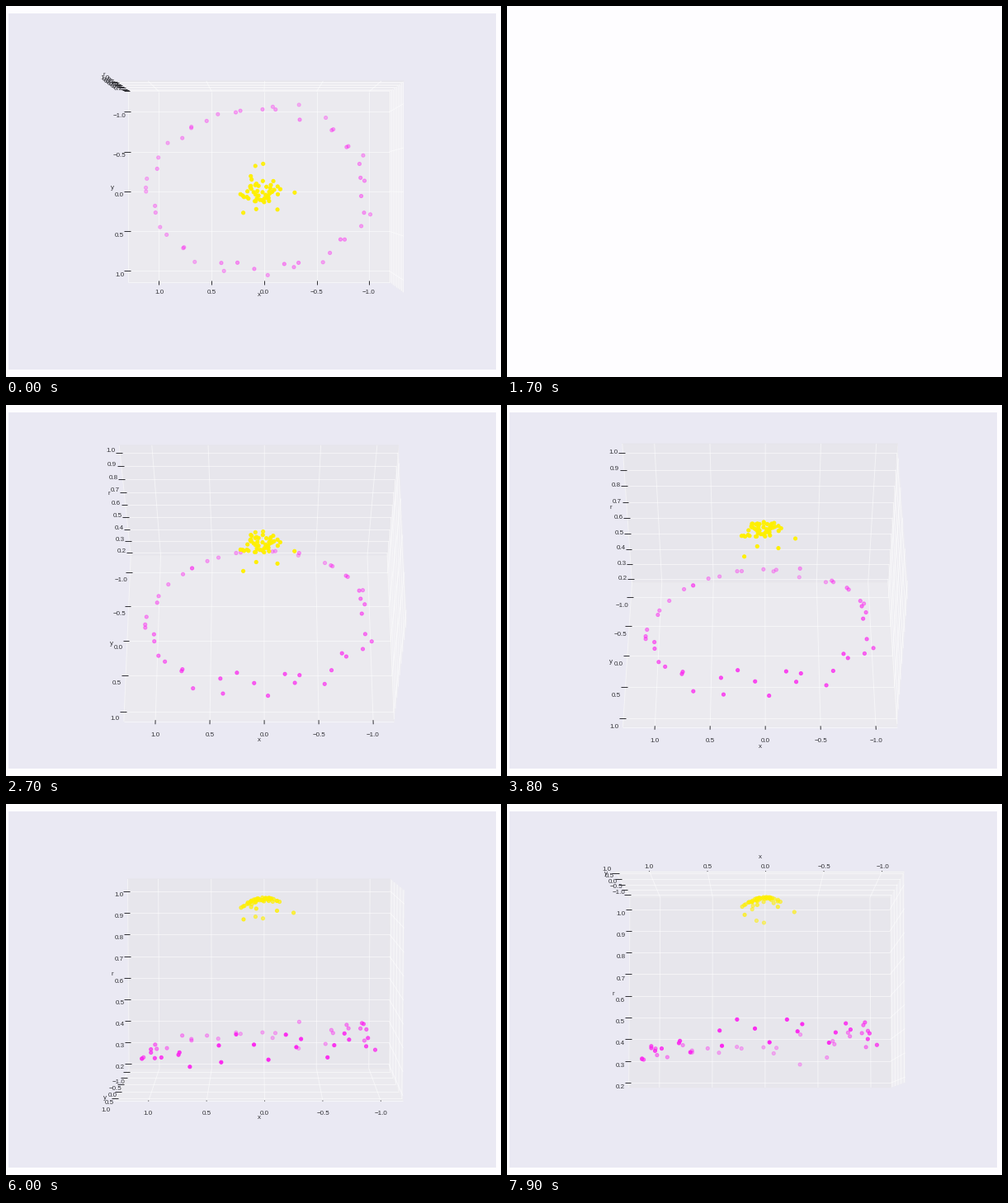
A matplotlib script that plays this animation: 600x450 px, repeating every 8000 ms.

```python
import numpy as np
import matplotlib.pyplot as plt
from matplotlib.animation import FuncAnimation
from matplotlib.collections import LineCollection, PolyCollection
from matplotlib.patches import Rectangle

W, H, FRAMES, STEP = 600, 450, 80, 100
PT = 0.72                                   # points per pixel at 100 dpi
INK = "#333338"
BLANK = 17                                  # redraw flicker

plt.rcParams["font.family"] = "Liberation Sans"

# The elevation is dragged by hand, with short rests
RESTS = [*range(6), 9, 12, 28, 32, 39, 40, 46, 50, 54, 61, 62, 72]
KEYS = {5: 90, 8: 83.5, 16: 80, 27: 58.2, 38: 46.5, 45: 30, 53: 17,
        60: 6.3, 71: 0.2, 79: -4.5}
steps = np.cumsum(~np.isin(np.arange(FRAMES), RESTS))
elev = np.interp(steps, steps[list(KEYS)], list(KEYS.values()))

# Axes rectangle in pixels and the scale of the perspective view
LEFT, TOP, BW, BH = 3, 9, 591, 432
KX, KY = BW / 0.185, BH / 0.185
CX, CY = LEFT + KX * 0.095, TOP + KY * 0.09
DIST = 10
EDGE = 0.5 + 1 / 48
TICK_PAD, NAME_PAD, DROP = 0.037, 0.067, 1.5

LOW = np.array([-1.14, -1.21, 0.196])
HIGH = np.array([1.24, 1.09, 1.038])
HALVES = np.linspace(-1, 1, 5)
TICKS = [HALVES, HALVES, np.linspace(0.2, 1, 9)]
NAMES = "xyr"
FLIP = (1, 0, 0)                            # direction of each axis' ticks


def circle(rng, radius, center, noise, n=50):
    t = np.linspace(0, 2 * np.pi, n, endpoint=False)
    ring = radius * np.column_stack([np.cos(t), np.sin(t)])
    return center + ring + noise(rng, (n, 2))


def to_cube(v, i=slice(None)):
    return (v - LOW[i]) / (HIGH[i] - LOW[i]) - 0.5


def project(p, angle):
    """Pixel positions and depths of cube points seen from azimuth 90."""
    x, y, z = np.moveaxis(np.asarray(p, float), -1, 0)
    s, c = np.sin(np.radians(angle)), np.cos(np.radians(angle))
    depth = DIST - (c * y + s * z)
    up = c * z - s * y
    return np.stack([CX - KX * x / depth, CY - KY * up / depth], -1), depth


def at(p, i, v):
    q = np.array(p, float)
    q[i] = v
    return q


def outward(p, i, pad):
    return at(p + np.sign(p) * pad, i, p[i])


def scene(angle):
    far = np.array([-EDGE, -EDGE, EDGE if angle < 0 else -EDGE])
    panes, grid, ticks, tick_pos, name_pos = [], [], [], [], []
    for i, f in enumerate(FLIP):
        j, k = (i + 1) % 3, (i + 2) % 3
        panes.append([at(at(far, j, a), k, b) for a, b in
                      ((-EDGE, -EDGE), (EDGE, -EDGE), (EDGE, EDGE), (-EDGE, EDGE))])
        base = at(far, f, -far[f])
        grid.append([at(base, i, -EDGE), at(base, i, EDGE)])
        for v in to_cube(TICKS[i], i):
            p = at(far, i, v)
            grid += [[p, at(p, j, -p[j])], [p, at(p, k, -p[k])]]
            q = at(base, i, v)
            ticks.append([at(q, f, q[f] - 0.1 / 12), at(q, f, q[f] + 0.2 / 12)])
            tick_pos.append(outward(q, i, TICK_PAD))
        name_pos.append(outward(at(base, i, 0), i, NAME_PAD))
    return [project(part, angle)[0]
            for part in (panes, grid, ticks, tick_pos, name_pos)]


rng = np.random.default_rng(4)
ring = circle(rng, 1, (0.03, -0.05), lambda r, n: r.uniform(-0.09, 0.09, n))
blob = circle(rng, 0.08, (0.02, -0.01), lambda r, n: r.normal(0, 0.08, n))
xy = np.vstack([ring, blob])
points = to_cube(np.column_stack([xy, np.exp(-(xy ** 2).sum(1))]))
colors = np.ones((len(xy), 4))
colors[:len(ring), :3] = 0.99, 0.15, 0.94
colors[len(ring):, :3] = 1, 0.94, 0

fig = plt.figure(figsize=(W / 100, H / 100), dpi=100, facecolor="#fefdff")
ax = fig.add_axes([0, 0, 1, 1])
ax.set(xlim=(0, W), ylim=(H, 0))
ax.axis("off")
ax.add_patch(Rectangle((LEFT, TOP), BW, BH, color="#eae9f3", lw=0, zorder=0))

pane_rgba = [(g, g - 0.005, g, 0.5) for g in (0.95, 0.90, 0.925)]
pane_art = PolyCollection([], facecolors=pane_rgba, edgecolors=pane_rgba,
                          linewidths=0.4, zorder=1)
grid_art = LineCollection([], colors="white", linewidths=PT, alpha=0.55, zorder=2)
tick_art = LineCollection([], colors=INK, linewidths=PT, zorder=3)
for art in (pane_art, grid_art, tick_art):
    ax.add_collection(art, autolim=False)


def label(text, va):
    return ax.text(0, 0, text, size=8 * PT, color=INK, ha="center", va=va,
                   zorder=4)


tick_text = [label(f"{v:.1f}".replace("-", "\u2212"), "top")
             for vals in TICKS for v in vals]
name_text = [label(n, "center") for n in NAMES]
dots = ax.scatter(*np.zeros((2, len(xy))), s=(4.2 * PT) ** 2,
                  linewidths=0.9 * PT, zorder=5)


def draw(frame):
    ax.set_visible(frame != BLANK)
    angle = elev[frame]
    panes, grid, ticks, tick_pos, name_pos = scene(angle)
    pane_art.set_verts(panes)
    grid_art.set_segments(grid)
    tick_art.set_segments(ticks)
    for text, (x, y) in zip(tick_text + name_text, [*tick_pos, *name_pos]):
        text.set_position((x, y + DROP))

    # Farther dots fade
    pos, depth = project(points, angle)
    z = -DIST / depth
    rgba = colors.copy()
    rgba[:, 3] = 1 - 0.7 * (z - z.min()) / np.ptp(z)
    dots.set_offsets(pos)
    dots.set_facecolors(rgba)
    dots.set_edgecolors(rgba)
    return []


anim = FuncAnimation(fig, draw, frames=FRAMES, interval=STEP,
                     repeat=True, repeat_delay=0, blit=False)
plt.show()
```
